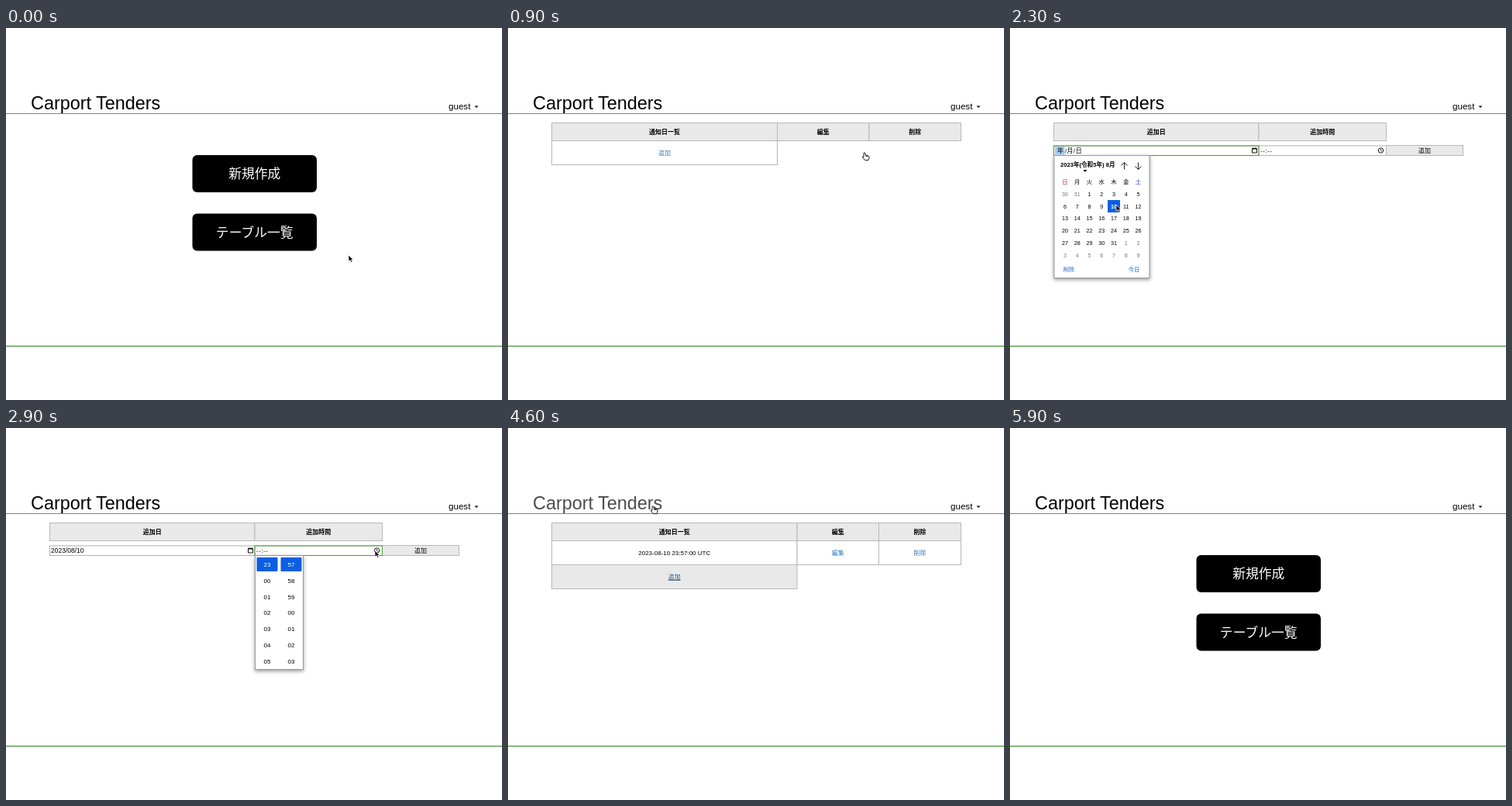
Write an HTML page that moves like this. It is 640 px wide and 480 px high and loops after 6000 ms.

```html
<!DOCTYPE html>
<html lang="ja">
<head>
<meta charset="utf-8">
<style>
html, body { margin: 0; width: 100%; height: 100%; overflow: hidden; background: #fff; }
svg { display: block; width: 640px; height: 480px; font: 8px "Liberation Sans", "Noto Sans CJK JP", sans-serif; }
.mid { text-anchor: middle; }
.bold { font-weight: bold; }
.link { fill: #337ab7; }
.link.hot { fill: #23527c; text-decoration: underline; }
.big { font-size: 16.8px; fill: #fff; }
.cell { stroke: #b8b8b8; }
.hover { opacity: .7; }
.pop { fill: #fff; stroke: #999; filter: drop-shadow(0 2px 2.5px #0006); }
</style>
</head>
<body>
<svg viewBox="0 0 640 480">
  <clipPath id="page"><rect width="640" height="410"/></clipPath>
  <text id="title" x="32" y="105" font-size="23.4">Carport Tenders</text>
  <text x="571" y="104.5" font-size="11.6">guest</text>
  <path d="M604.5 100.5h5l-2.5 2.5z"/>
  <path d="M0 110.5H640" stroke="#858585"/>
  <g id="scenes" clip-path="url(#page)"></g>
  <path d="M0 410.5H640" stroke="#2f7d21"/>
  <g id="cursor">
    <path id="arrow" d="M0 0V8.2L2 6.5 3.4 9.5 4.8 8.9 3.5 6H6Z" stroke="#fff" stroke-width=".7"/>
    <path id="hand" d="M-1 .3Q0-.8.8.3L1.6 3.4Q4.8 3.2 6 5L5.8 7.8 5 9.6H.6L-2.4 6Q-2.9 4.5-1 5.2Z M2 5V3.6M3.6 5.2V4" fill="#fff" stroke="#000" stroke-width=".9"/>
  </g>
</svg>
<script>
const $ = id => document.getElementById(id);
const GRAY = '#e9e9e9';

const text = (x, y, s, cls = 'mid', attrs = '') => `<text x="${x}" y="${y}" class="${cls}" ${attrs}>${s}</text>`;
const rect = (x, y, w, h, attrs) => `<rect x="${x}" y="${y}" width="${w}" height="${h}" ${attrs}/>`;
const group = (id, body) => `<g id="${id}">${body}</g>`;

// One table row; edges are the column borders
const row = (edges, y, h, fill, labels, cls = () => 'mid') => labels.map((s, i) => {
  const x = edges[i], w = edges[i + 1] - x;
  return rect(x, y, w, h, `class="cell" fill="${fill}"`) + text(x + w / 2, y + h / 2 + 3, s, cls(i));
}).join('');
const head = (edges, labels) => row(edges, 122.5, 23, GRAY, labels, () => 'mid bold');

function home() {
  const button = (id, y, s) => group(id, rect(240.5, y, 160.5, 48, 'rx="6"') + text(320.7, y + 30, s, 'mid big'));
  return button('create', 164, '新規作成') + button('open', 239.5, 'テーブル一覧');
}

function cars() {
  const edges = [56.5, 115.5, 156.5, 195.5, 294.5, 369.5, 436, 485.5, 535, 584.5];
  const models = [['Tamiro', 'Solenda'], ['Dozal', 'Ploma'], ['Orvant', 'Duskway'], ['Hatanobori', 'Vantelo'], ['Mizoka', 'Gleam']];
  const years = [2005, 2008, 2010, 2018, 2015, 2010, 2000, 2003, 2007];
  const dates = ['2023-09-10', '2022-11-20', '2024-01-15', '2023-04-10', '2023-08-25', '2023-09-05', '2023-12-05', '2023-12-30', '2023-03-20'];
  const rows = years.map((year, i) => {
    const plate = `${i ? 11 * (i + 1) : 13} ${'さあうえおかきくけ'[i]} ${1000 + i}`;
    const due = i % 2 ? ['', dates[i]] : [dates[i], ''];
    return row(edges, 145.5 + 30.85 * i, 30.85, i % 2 ? GRAY : '#fff',
      [...models[i % 5], year, plate, ...due, '設定', '編集', '削除'],
      c => c < 6 ? 'mid' : 'mid link' + (!i && c == 6 ? ' setting' : ''));
  });
  return head(edges, ['メーカー', 'モデル', '製造年', 'ナンバープレート', 'リース満了日', '車検更新日', '通知日', '編集', '削除']) + rows.join('');
}

function notices(edges, filled) {
  const add = (y, fill) => row(edges, y, 31, fill, ['追加'], () => 'mid link add');
  return head(edges, ['通知日一覧', '編集', '削除']) + (filled
    ? row(edges, 145.5, 31, '#fff', ['2023-08-10 23:57:00 UTC', '編集', '削除'], i => i ? 'mid link' : 'mid') + add(176.5, GRAY)
    : add(145.5, '#fff'));
}

function calendar() {
  const col = i => 71 + 15.75 * i;
  let s = rect(57, 164.5, 123, 158, 'class="pop"') +
    text(65, 179, '2023年(令和5年) 8月', 'bold', 'font-size="7.6"') +
    '<path d="M94.5 183h5l-2.5 3z"/>' +
    '<path d="M147.5 182.5v-9m-4 4l4-4 4 4M165.5 173.5v9m-4-4l4 4 4-4" fill="none" stroke="#222"/>' +
    rect(126, 222, 16, 16, 'fill="#0b5fe0"');
  [...'日月火水木金土'].forEach((d, i) => s += text(col(i), 200.5, d, 'mid', `font-size="7.4" fill="${{0: '#b3261e', 6: '#1a4fd0'}[i] || '#000'}"`));
  for (let i = 0; i < 42; i++) {
    const n = i - 1, day = n < 1 ? n + 31 : n > 31 ? n - 31 : n;
    const color = n == 10 ? '#fff' : n < 1 || n > 31 ? '#777' : '#000';
    s += text(col(i % 7), 217 + 15.7 * (i / 7 | 0), day, n == 10 ? 'mid bold' : 'mid', `font-size="7.2" fill="${color}"`);
  }
  return s + text(76, 314, '削除', 'mid', 'font-size="7.2" fill="#1a66d8"') + text(160, 314, '今日', 'mid', 'font-size="7.2" fill="#1a66d8"');
}

function clock() {
  let s = rect(321.5, 164.5, 62, 147, 'class="pop"');
  [[23, 24], [57, 60]].forEach(([start, wrap], c) => {
    const x = 337 + 31 * c;
    s += rect(x - 13.5, 167, 27, 18, 'rx="1" fill="#0b5fe0"');
    for (let i = 0; i < 7; i++)
      s += text(x, 179 + 20.8 * i, String((start + i) % wrap).padStart(2, '0'), 'mid', `fill="${i ? '#000' : '#fff'}"`);
  });
  return s;
}

function form() {
  const field = (x, w) => rect(x, 152, w, 12.5, 'fill="#fff" stroke="#b0b0b0"');
  const ring = (id, x, w) => group(id, rect(x, 152, w, 12.5, 'fill="none" stroke="#4f9a3c"'));
  return head([56.5, 321, 485.5], ['追加日', '追加時間']) +
    field(56.5, 264.5) + field(321, 164.5) +
    rect(485.5, 151.5, 99, 13, `class="cell" fill="${GRAY}"`) + text(535, 161, '追加') +
    group('mark', rect(58, 153, 12.5, 10.5, 'fill="#a9cbf5"')) +
    group('noDate', text(61, 161, '年', '') + text(71, 161, '/月/日', '', 'letter-spacing=".4"')) +
    group('date', text(58, 161, '2023/08/10', '', 'font-size="8.5"')) +
    group('noTime', text(323, 161, '--:--', '', 'letter-spacing=".5"')) +
    group('time', text(323, 161, '23:57', '', 'font-size="8.3"')) +
    '<path d="M312.5 155.5h6v5.5h-6zM312.5 156h6M314 154v1.5M317 154v1.5" fill="none" stroke="#111"/>' +
    '<g fill="none" stroke="#111"><circle cx="478.5" cy="158" r="3.2"/><path d="M478.5 156v2.3l1.6 1" stroke-width=".8"/></g>' +
    ring('dateRing', 56.5, 264.5) + ring('timeRing', 321, 164.5) +
    group('calendar', calendar()) + group('clock', clock());
}

$('scenes').innerHTML = group('home', home()) + group('cars', cars()) +
  group('empty', notices([56.5, 347.5, 466, 584.5])) + group('form', form()) +
  group('list', notices([56.5, 373, 478.5, 584.5], true));

// Ticks of 100 ms: [tick, x, y] of the pointer tip
const path = [[0, 442, 293], [2, 356, 266], [3, 357, 266], [7, 460, 161], [9, 460, 161], [13, 204, 159], [15, 202, 158],
  [18, 315, 157], [19, 314, 159], [22, 139, 225], [23, 137, 228], [24, 136, 229], [28, 477, 156], [29, 476, 158],
  [32, 337, 174], [33, 366, 174], [35, 477, 172], [36, 479, 173], [38, 530, 157], [39, 534, 157], [41, 534, 157],
  [45, 216, 188], [46, 187, 101], [48, 187, 101], [54, 324, 261], [60, 324, 261]];
const hands = [[2, 4], [7, 10], [13, 16], [40, 42], [45, 50], [53, 59]];
const visible = {
  home: t => t < 3 || t >= 47, cars: t => t >= 3 && t < 8, empty: t => t >= 8 && t < 16,
  form: t => t >= 16 && t < 40, list: t => t >= 40 && t < 47,
  calendar: t => t >= 19 && t < 25, clock: t => t >= 29 && t < 36,
  mark: t => t >= 19 && t < 25, noDate: t => t < 25, date: t => t >= 25,
  noTime: t => t < 33, time: t => t >= 33,
  dateRing: t => t >= 19 && t < 29, timeRing: t => t >= 29 && t < 36,
  cursor: t => t < 59
};

function pointer(t) {
  const i = path.findIndex(p => p[0] > t), [t0, x0, y0] = path[i - 1], [t1, x1, y1] = path[i];
  const k = (t - t0) / (t1 - t0), e = k * k * (3 - 2 * k);
  return [x0 + (x1 - x0) * e, y0 + (y1 - y0) * e];
}

function draw(now) {
  const t = Math.floor(now % 6000 / 100);
  for (const id in visible) $(id).style.display = visible[id](t) ? '' : 'none';
  const hand = hands.some(([a, b]) => t >= a && t < b);
  $('hand').style.display = hand ? '' : 'none';
  $('arrow').style.display = hand ? 'none' : '';
  $('cursor').setAttribute('transform', `translate(${pointer(t)})`);
  $('title').classList.toggle('hover', t >= 46 && t < 50);
  $('open').classList.toggle('hover', t == 2 || t >= 53 && t < 59);
  document.querySelector('.setting').classList.toggle('hot', t == 7);
  document.querySelector('#empty .add').classList.toggle('hot', t >= 13);
  document.querySelector('#list .add').classList.toggle('hot', t == 45 || t == 46);
}

const start = performance.now();
function loop() {
  draw(performance.now() - start);
  requestAnimationFrame(loop);
}
loop();
</script>
</body>
</html>
```
